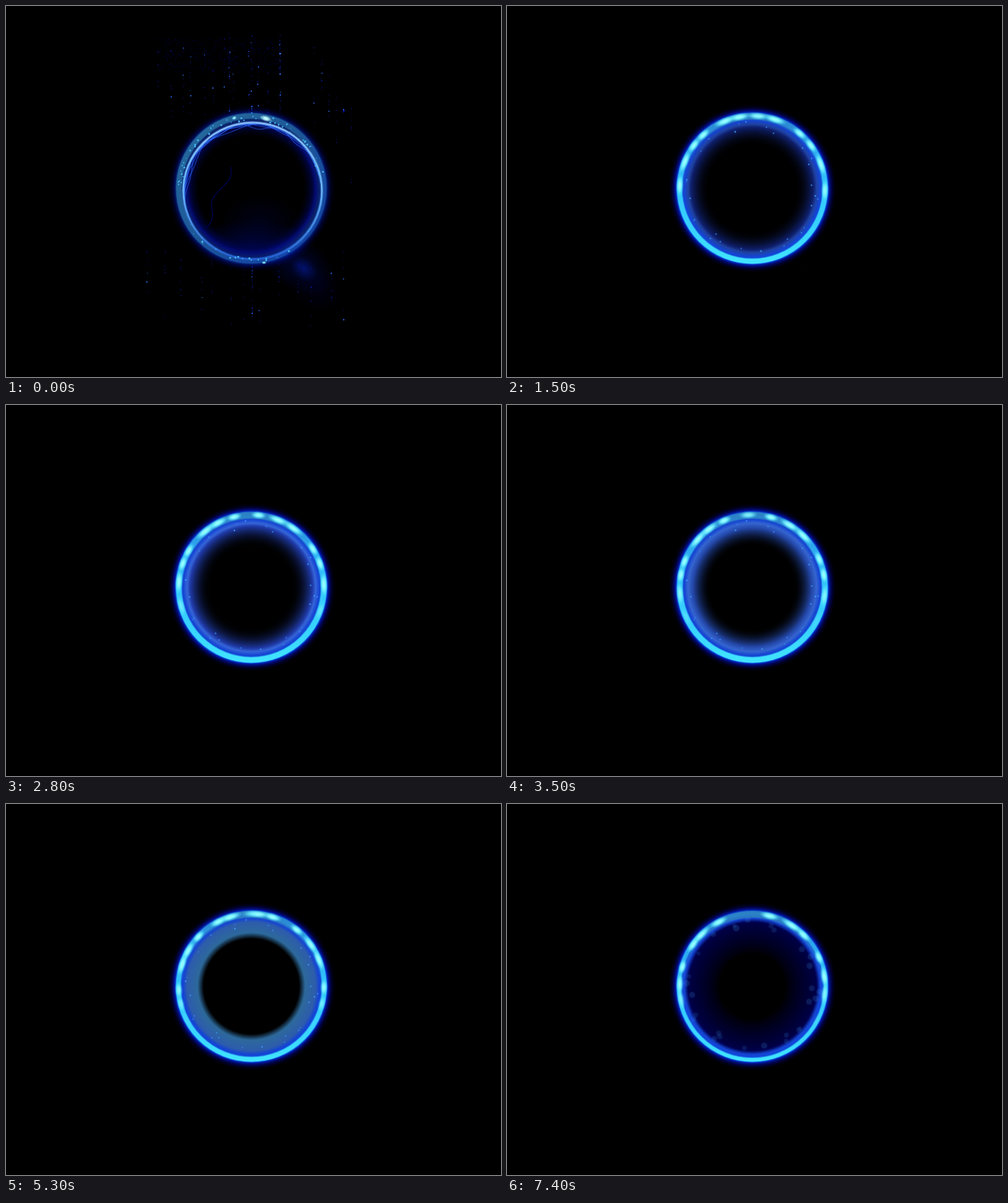
These frames come from a looping animation (800 by 600 pixels, 7.5 s). An HTML page with a canvas:

```html
<!DOCTYPE html>
<html lang="en">
<head>
<meta charset="utf-8">
<title>Energy ring</title>
<style>
html, body { margin: 0; width: 100%; height: 100%; overflow: hidden; background: #000; }
canvas { display: block; }
</style>
</head>
<body>
<canvas id="stage" width="800" height="600"></canvas>
<script>
const ctx = document.getElementById('stage').getContext('2d');
const CX = 396.5, CY = 295, R = 117.3, TAU = Math.PI * 2, LOOP = 7500;

// Light inside the ring: black at radius `edge`, `fill` colour at `full`, `rim` colour at RIM.
const RIM = 104;
const POSES = [
  { t: 0, edge: 82, full: 100, bend: 2, fill: [0, 4, 66], rim: [4, 12, 112] },
  { t: .7, edge: 72, full: 99, bend: 2, fill: [5, 15, 72], rim: [18, 44, 128] },
  { t: 2.9, edge: 66, full: 99, bend: 2, fill: [32, 60, 172], rim: [55, 104, 220] },
  { t: 5.3, edge: 77, full: 87, bend: 1, fill: [45, 105, 155], rim: [45, 92, 172] },
  { t: 6.4, edge: 57, full: 98, bend: .8, fill: [5, 15, 88], rim: [5, 15, 106] },
  { t: 7.4, edge: 53, full: 100, bend: .8, fill: [0, 0, 66], rim: [0, 0, 78] }
];

let seed = 7;
function rnd(from = 0, to = 1) {
  seed = (seed * 16807) % 2147483647;
  return from + (to - from) * seed / 2147483647;
}
const make = (count, fn) => Array.from({ length: count }, (_, n) => fn(n));
const lerp = (a, b, u) => a + (b - a) * u;
const mix = (a, b, u) => a.map((v, n) => lerp(v, b[n], u));
const clamp = v => Math.max(0, Math.min(1, v));
const rgba = (c, a = 1) => `rgba(${c.map(Math.round)},${a})`;

// Falling light: columns above, below and right of the ring.
const column = (x, top, bottom, count, light) => make(count, () => ({
  x: x + rnd(-.8, .8), y: rnd(top, bottom), r: rnd(.4, .9), glint: rnd() < light
}));
const rain = [
  ...[361, 397, 443].map(x => column(x, 45, 180, 30, .2)),
  column(398, 418, 505, 32, .15),
  ...make(12, n => column(246 + n * 18 + rnd(-5, 5), rnd(50, 90), rnd(125, 190), 11, .06)),
  ...make(6, n => column(498 + n * 12, rnd(65, 200), rnd(120, 350), 9, .1)),
  ...make(13, n => column(233 + n * 26 + rnd(-8, 8), rnd(385, 435), rnd(460, 530), 8, .06))
].flat();
const haze = make(420, () => [rnd(243, 448), rnd(52, 107)]);
const embers = make(75, n => ({
  a: n % 4 ? rnd(-3.1, -.1) : rnd(.6, 2.7), d: rnd(110, 119), r: rnd(.6, 1.7)
}));
const wisps = make(14, () => ({
  depth: rnd(1, 6), k: Math.floor(rnd(3, 10)), p: rnd(0, TAU),
  from: rnd(2.6, 4.6), span: rnd(1.2, 2.6)
}));
const dots = make(28, n => ({
  a: n * 2.4 + rnd(-.2, .2), d: 108 - 14 * rnd() ** 2,
  spin: rnd(-.015, .015), sink: rnd(-.8, .4), scale: rnd(.7, 1.2)
}));

function dot(x, y, r) {
  ctx.beginPath();
  ctx.arc(x, y, r, 0, TAU);
  ctx.fill();
}

// Soft ellipse, stretched along its own x axis.
function puff(x, y, rx, ry, color, alpha, angle = 0, solid = 0) {
  const g = ctx.createRadialGradient(0, 0, 0, 0, 0, 1);
  g.addColorStop(0, rgba(color, alpha));
  g.addColorStop(solid, rgba(color, alpha));
  g.addColorStop(1, rgba(color, 0));
  ctx.save();
  ctx.translate(x, y);
  ctx.rotate(angle);
  ctx.scale(rx, ry);
  ctx.fillStyle = g;
  dot(0, 0, 1);
  ctx.restore();
}

function softRing(radius, width, style, alpha) {
  ctx.strokeStyle = style;
  for (const [grow, part] of [[3, .25], [1.5, .4], [0, .85]]) {
    ctx.globalAlpha = alpha * part;
    ctx.lineWidth = width + grow;
    ctx.beginPath();
    ctx.arc(CX, CY, radius, 0, TAU);
    ctx.stroke();
  }
  ctx.globalAlpha = 1;
}

// Gradient across the ring; dx, dy point from its start to its end.
function across(dx, dy, ...colors) {
  const g = ctx.createLinearGradient(CX - dx, CY - dy, CX + dx, CY + dy);
  colors.forEach((color, n) => g.addColorStop(n / (colors.length - 1), color));
  return g;
}

function drawGlow(t, power) {
  const next = Math.max(1, POSES.findIndex(p => p.t >= t));
  const a = POSES[next - 1], b = POSES[next], u = (t - a.t) / (b.t - a.t);
  const edge = lerp(a.edge, b.edge, u), full = lerp(a.full, b.full, u);
  const bend = lerp(a.bend, b.bend, u), fill = mix(a.fill, b.fill, u);

  const size = 138, g = ctx.createRadialGradient(CX, CY, 0, CX, CY, size);
  const stop = (r, color) => g.addColorStop(r / size, rgba(color));
  for (let s = 0; s <= 1; s += .125) {
    stop(lerp(edge, full, s), fill.map(v => v * s ** bend));
  }
  stop(RIM, mix(a.rim, b.rim, u));
  const shine = lerp(.5, 1, power);
  stop(110, [20, 68, 210].map(v => v * shine));
  stop(121, [10, 76, 235].map(v => v * shine));
  // The halo falls off quickly outside the ring.
  for (let s = 0; s <= 1; s += .2) {
    stop(lerp(122.5, size, s), [0, 45 * (1 - s) ** 6, 205 * (1 - s) ** 2.4].map(v => v * shine));
  }
  ctx.fillStyle = g;
  dot(CX, CY, size);
}

// Flares leave the top and slide down both sides.
function drawFlares(t, power) {
  for (const [side, first, gap] of [[-1, -70, 15], [1, -84, 17]]) {
    for (let n = 0; n < 10; n++) {
      const deg = first + gap * n + 3 * Math.sin(n * 2.3) + 13.2 * t;
      const alpha = clamp((deg + 4) / 10) * clamp((122 - deg) / 35) * power;
      if (!alpha) continue;
      const a = side * deg * Math.PI / 180;
      const x = CX + Math.sin(a) * R, y = CY - Math.cos(a) * R;
      const len = 17 + 4 * Math.sin(n * 1.7);
      puff(x, y, len, 6.5, [90, 236, 255], alpha, a, .3);
      puff(x, y, len * .75, 4.5, [165, 255, 255], alpha * .8, a, .2);
    }
  }
}

function drawDots(t) {
  const swell = clamp((t - 4.8) / 2.6);
  const size = 1.1 + 4.2 * swell ** 3, alpha = clamp(t / .7) * .9 * (1 - .84 * swell ** 1.5);
  for (const p of dots) {
    const a = p.a + p.spin * t, d = p.d + p.sink * t, r = size * p.scale;
    const x = CX + d * Math.cos(a), y = CY + d * Math.sin(a);
    puff(x, y, r + 1.5, r + 1.5, [40, 110, 240], alpha * .5);
    ctx.fillStyle = rgba([80, 185, 250], alpha * p.scale * .8);
    dot(x, y, r * .85);
  }
}

function drawRain(fade) {
  ctx.globalAlpha = fade;
  ctx.fillStyle = '#00003c';
  haze.forEach(([x, y]) => ctx.fillRect(x, y, 1.2, 1.2));
  for (const { x, y, r, glint } of rain) {
    ctx.fillStyle = glint ? '#2868e6' : '#06107a';
    dot(x, y, glint ? r + .3 : r);
  }
  puff(474, 420, 60, 42, [0, 8, 80], .6, .5);
  puff(482, 425, 24, 18, [4, 22, 110], .6, .7);
  puff(505, 460, 40, 36, [0, 0, 45], .4);
  ctx.globalAlpha = 1;
}

function drawSpark(fade) {
  ctx.globalAlpha = fade;
  puff(398, 385, 95, 40, [0, 8, 110], .55);
  puff(410, 350, 65, 45, [0, 4, 50], .45);

  ctx.strokeStyle = '#00004b';
  ctx.lineWidth = 1.6;
  ctx.beginPath();
  for (let s = 0; s <= 1; s += .1) {
    ctx.lineTo(363 - 43 * s + 7 * Math.sin(s * 9), 260 + 100 * s);
  }
  ctx.stroke();

  softRing(R, 8, across(85, 85, 'rgba(38,108,158,1)', 'rgba(34,98,160,.75)',
    'rgba(28,90,190,.5)'), fade);
  ctx.globalAlpha = fade;
  ctx.lineWidth = 1.1;
  ctx.strokeStyle = 'rgba(45,110,255,.6)';
  for (const w of wisps) {
    ctx.beginPath();
    for (let s = 0; s <= 1; s += .02) {
      const a = w.from + w.span * s;
      const r = 111 - w.depth * (1 + Math.sin(w.k * a + w.p)) * Math.sin(Math.PI * s);
      ctx.lineTo(398.5 + r * Math.cos(a), 299 + r * Math.sin(a));
    }
    ctx.stroke();
  }
  ctx.strokeStyle = across(0, 124, '#96c8ff', '#6ebeff', '#1e5ad2');
  for (const [width, alpha] of [[5, .35], [2.2, 1]]) {
    ctx.globalAlpha = fade * alpha;
    ctx.lineWidth = width;
    ctx.beginPath();
    ctx.ellipse(398.5, 299, 112, 110.5, 0, 0, TAU);
    ctx.stroke();
  }
  ctx.globalAlpha = fade;
  ctx.fillStyle = '#46b4f0';
  embers.forEach(e => dot(CX + e.d * Math.cos(e.a), CY + e.d * Math.sin(e.a), e.r));
  puff(420, 182, 10, 5, [190, 250, 255], 1, .3, .3);
  puff(369, 181, 4, 3, [150, 240, 255], 1, -.3, .3);
  puff(417, 415, 4, 2.5, [130, 230, 255], 1, 0, .3);
  ctx.globalAlpha = 1;
}

function draw(t) {
  const power = clamp(t / .7);
  const rainFade = clamp(1 - t / 1.7) ** 2;
  const sparkFade = clamp(1 - t / .85);
  const width = 5.3 + 3 * Math.sin(Math.PI * clamp(t / 6.4));

  ctx.fillStyle = '#000';
  ctx.fillRect(0, 0, 800, 600);
  drawGlow(t, power);

  ctx.globalCompositeOperation = 'lighter';
  if (rainFade) drawRain(rainFade);
  ctx.globalCompositeOperation = 'source-over';

  // A wide teal band on top narrows into the cyan core further down.
  softRing(R - .5, 10, across(0, 124, 'rgba(48,132,186,.9)', 'rgba(42,130,210,.45)',
    'rgba(40,130,220,0)', 'rgba(40,130,220,0)', 'rgba(40,130,220,0)'), power);
  softRing(121.4 - width / 2, width, across(0, 124, 'rgba(55,190,240,0)',
    'rgba(52,200,250,.6)', 'rgba(56,212,255,.95)', 'rgb(58,220,255)', 'rgb(70,240,255)'), power);
  if (sparkFade) drawSpark(sparkFade);
  drawFlares(t, power);
  drawDots(t);
}

function frame() {
  draw(Math.floor((performance.now() % LOOP) / 100) / 10);
  requestAnimationFrame(frame);
}
frame();
</script>
</body>
</html>
```
